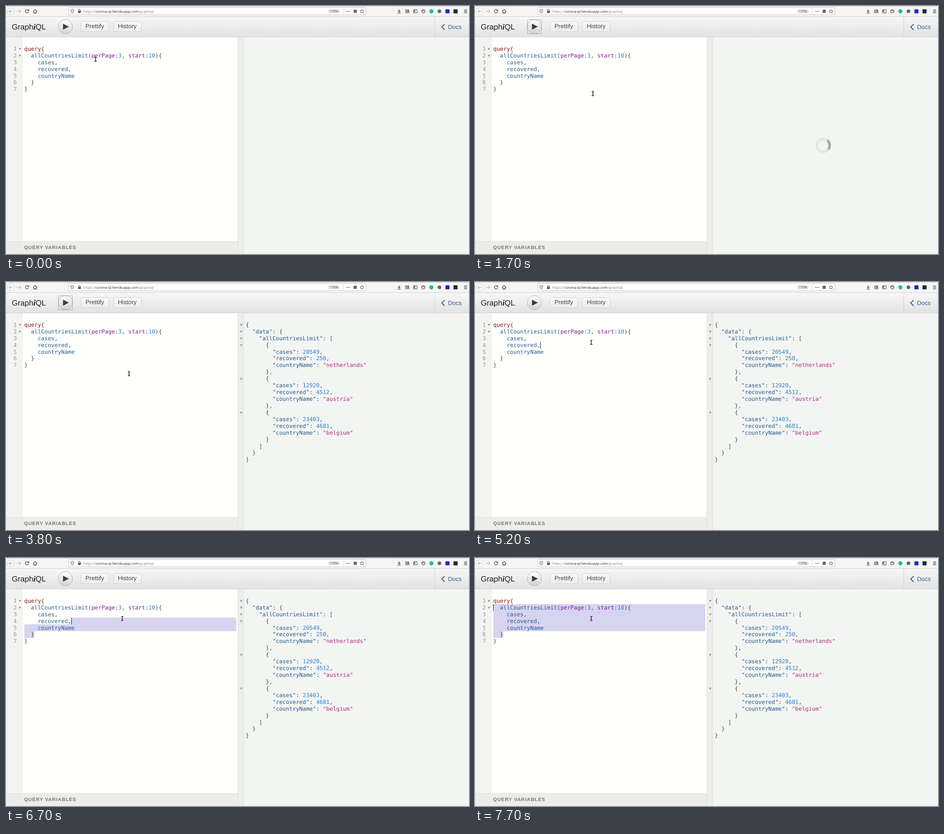
These frames come from a looping animation (1021x549 px, 8000 ms). An HTML page:

```html
<!DOCTYPE html>
<html lang="en">
<head>
<meta charset="utf-8">
<title>GraphiQL</title>
<style>
  html, body { margin: 0; width: 100%; height: 100%; overflow: hidden; background: #f3f5f3; }
  svg { display: block; width: 1021px; height: 549px; }
  text { white-space: pre; text-rendering: geometricPrecision; font: 13.26px "Liberation Sans", Arial, sans-serif; fill: #444; }
  .code text { font: 12.31px "DejaVu Sans Mono", monospace; fill: #484848; }
  .code .num { fill: #999; }
  .fold { fill: #999; }
  .url { font: 7.9px "Open Sans", sans-serif; fill: #858585; }
  .icons { fill: none; stroke: #555; stroke-width: 1.2; }
</style>
</head>
<body>
<svg viewBox="0 0 1021 549">
  <defs>
    <linearGradient id="bar" x2="0" y2="1"><stop stop-color="#f7f7f7"/><stop offset="1" stop-color="#e2e2e2"/></linearGradient>
    <linearGradient id="btn" x2="0" y2="1"><stop stop-color="#f9f9f9"/><stop offset="1" stop-color="#ececec"/></linearGradient>
    <linearGradient id="play" x2="0" y2="1"><stop stop-color="#fdfdfd"/><stop offset="1" stop-color="#d2d3d6"/></linearGradient>
    <linearGradient id="pressed" x2="0" y2="1"><stop stop-color="#dddddd"/><stop offset="1" stop-color="#f8f8f8"/></linearGradient>
  </defs>

  <!-- browser bar -->
  <rect width="1021" height="24" fill="#f5f5f4"/>
  <rect width="1021" height="1" fill="#c9c9c7"/>
  <rect x="138.5" y="3.5" width="655" height="16" rx="1.5" fill="#fff" stroke="#c8c8c8"/>
  <g class="icons">
    <circle cx="10.5" cy="11.8" r="8" fill="#f9f9f8" stroke="#d2d2d2" stroke-width="1"/>
    <path d="M14.5 11.8H7M10 8.5L6.7 11.8L10 15M24.5 11.8H32M29.5 8.5L32.7 11.8L29.5 15" stroke="#b4b4b4"/>
    <path d="M49.3 9.3A3.7 3.7 0 1 0 50 13M50.3 7.5V10.5H47" stroke="#444"/>
    <path d="M59.8 12L64.2 7.8L68.6 12M61.2 11.5V15.7H67.2V11.5M64.2 15.5V13" stroke="#444"/>
    <path d="M142.8 8.6L146 7.8L149.2 8.6V11.5Q149 14.5 146 16Q143 14.5 142.8 11.5ZM146 10V13.6" stroke-width="1"/>
    <path d="M160 11V9.8A2 2 0 0 1 164 9.8V11"/>
    <rect x="158.8" y="11" width="6.4" height="4.5" rx=".8" fill="#555" stroke="none"/>
    <rect x="709.5" y="7" width="26.5" height="9.5" rx="4.7" fill="#e4e4e4" stroke="none"/>
    <path d="M743.5 5V18.5" stroke="#d2d2d2" stroke-width="1"/>
    <path d="M750.4 11.8H758.6" stroke-width="1.8" stroke-dasharray="1.8 1.4"/>
    <rect x="766.5" y="8.2" width="7" height="7" rx="1" fill="#666" stroke="none"/>
    <path d="M785 7.6L786.2 10.4L789.2 10.7L786.9 12.7L787.6 15.7L785 14.1L782.4 15.7L783.1 12.7L780.8 10.7L783.8 10.4Z" stroke-width="1"/>
    <path d="M867 7.5V13M864.3 10.7L867 13.4L869.7 10.7M863.5 15.7H870.5" stroke="#444"/>
    <path d="M881.5 7.5V16M884 7.5V16M886.4 7.5V16M887.3 8L889.3 15.8" stroke="#444"/>
    <path d="M898.6 8.2H906.6V15.2H898.6ZM901.8 8.2V15.2M899 10.2H901M899 12H901" stroke="#444" stroke-width="1"/>
    <circle cx="920.3" cy="11.8" r="3.6" stroke="#444"/><path d="M918 10.6H922.6" stroke="#444"/>
    <path d="M1010 8.7H1017M1010 11.8H1017M1010 14.9H1017" stroke="#444"/>
    <g stroke="none">
      <circle cx="938" cy="11.8" r="4.6" fill="#17c39a"/>
      <circle cx="955.8" cy="11.8" r="4" fill="#65656b"/>
      <rect x="969" y="7.3" width="9" height="9" rx="1.5" fill="#2426c9"/>
      <rect x="986.8" y="7.3" width="9" height="9" fill="#1e2a35"/>
    </g>
  </g>
  <text class="url" x="170.3" y="14.8">https://<tspan fill="#222">corona-ql.herokuapp.com</tspan>/graphiql</text>
  <text x="714.5" y="14.3" style="font:7px 'Open Sans',sans-serif">170%</text>

  <!-- toolbar -->
  <rect y="23.5" width="1021" height="45" fill="url(#bar)"/>
  <path d="M0 23.5H1021M0 68.5H1021M945.5 24V68" stroke="#d0d0d0"/>
  <text x="12.8" y="52" style="font-size:17.04px;fill:#1d1d1d">Graph<tspan style="font:italic bold 18px 'Liberation Serif',serif">i</tspan>QL</text>
  <circle id="run" cx="131" cy="45.8" r="15.8" fill="url(#play)" stroke="#b3b3b3"/>
  <path d="M125.7 39.2L138.6 45.8L125.7 52.4Z" fill="#3d3d3d"/>
  <rect id="focus" x="115.5" y="30.5" width="31" height="31" fill="none" stroke="#666" stroke-dasharray="1 1"/>
  <rect x="165.5" y="34.5" width="61.5" height="22.5" rx="3" fill="url(#btn)" stroke="#cfcfcf"/>
  <rect x="236.9" y="34.5" width="61.5" height="22.5" rx="3" fill="url(#btn)" stroke="#cfcfcf"/>
  <text x="175.2" y="49.4">Prettify</text>
  <text x="246.7" y="49.4">History</text>
  <path d="M967.3 40.3L960.8 46.5L967.3 52.7" fill="none" stroke="#3b5998" stroke-width="1.9"/>
  <text x="974.8" y="51" style="fill:#3b5998">Docs</text>

  <!-- panes -->
  <rect y="69" width="512" height="452" fill="#fffffc"/>
  <rect y="69" width="35.5" height="452" fill="#f3f4f1"/>
  <path d="M35.5 69V521" stroke="#e6e7e4"/>
  <rect x="511.5" y="69" width="13" height="480" fill="#eceeec"/>
  <rect x="524.5" y="69" width="497" height="480" fill="#f3f5f3"/>
  <rect y="521" width="511.5" height="28" fill="#ecedea"/>
  <path d="M0 521.2H511.5M511.5 69V549M524 69V549" stroke="#dfe0de"/>
  <text x="40" y="538.4" style="font-weight:bold;font-size:10.65px;letter-spacing:.95px;fill:#747474">QUERY VARIABLES</text>

  <g id="selection" fill="#d7d4f0"></g>
  <g id="query" class="code"></g>
  <g id="result" class="code"></g>
  <g id="folds" class="fold"></g>
  <rect id="caret" width="1" height="15" fill="#111"/>
  <g id="spinner" fill="none" stroke-width="5.6">
    <circle r="14.2" stroke="#969696" stroke-opacity=".15"/>
    <path d="M-10.04 -10.04A14.2 14.2 0 0 1 10.04 -10.04" stroke="#969696" stroke-opacity=".8"/>
  </g>

  <g id="beam" fill="none">
    <path d="M-2.5 -4.3H2.5M0 -4.3V4.3M-2.5 4.3H2.5" stroke="#333" stroke-width="1.7"/>
  </g>
  <path id="hand" d="M-1.6 -4.6Q-.7 -5.4 0 -4.6V-1.4L3.8 -.5Q4.8 0 4.6 1.2L3.8 4.6H-1L-4 .8Q-3.6 -.4 -2.6 .2L-1.6 1Z" fill="#fff" stroke="#222" stroke-width="1.1"/>
</svg>
<script>
const LOOP = 8000, CHAR = 7.41, LINE = 14.93, TOP = 87.1, LEFT = 40.3, RIGHT = 508;
const $ = id => document.getElementById(id);
const show = (id, on) => $(id).style.display = on ? '' : 'none';
const lineY = i => TOP + i * LINE;
const text = (x, i, body, cls = '') => `<text class="${cls}" x="${x}" y="${lineY(i) + 11.7}">${body}</text>`;
const fold = (x, i) => `<path d="M${x} ${lineY(i) + 6}h5.4l-2.7 4.8z"/>`;

function color(token, next) {
  if (token === 'query') return '#8a1318';
  if (/^\d/.test(token)) return '#2e7fd0';
  if (token[0] === '"') return next === ':' ? '#245a8a' : '#b5297e';
  return next === ':' ? '#7b1e96' : '#265f90';
}
const highlight = line => line.replace(/"\w+"|\w+/g, (token, at) =>
  `<tspan fill="${color(token, line[at + token.length])}">${token}</tspan>`);
const block = (x, lines) => lines.map((line, i) => text(x, i, highlight(line))).join('');

const query = ['query{', '  allCountriesLimit(perPage:3, start:10){', '    cases,',
  '    recovered,', '    countryName', '  }', '}'];
const data = { data: { allCountriesLimit: [
  { cases: 20549, recovered: 250, countryName: 'netherlands' },
  { cases: 12920, recovered: 4512, countryName: 'austria' },
  { cases: 23403, recovered: 4681, countryName: 'belgium' }
] } };

$('query').innerHTML = block(LEFT, query) +
  query.map((_, i) => text(16.4, i, i + 1, 'num')).join('') +
  `<g class="fold">${fold(28, 0) + fold(28, 1)}</g>`;
$('result').innerHTML = block(528.4, JSON.stringify(data, null, 2).split('\n'));
$('folds').innerHTML = [0, 1, 2, 3, 8, 13].map(i => fold(516, i)).join('');

// time, x, y, hand?
const pointer = [
  [0, 197.5, 118], [100, 185, 111], [200, 165, 101], [300, 150.5, 91],
  [500, 136, 64, 1], [600, 130.5, 58, 1], [1400, 150, 82], [1500, 190, 125],
  [1600, 232, 168], [1700, 260, 194], [1800, 266, 204], [1900, 269, 209],
  [2000, 270.5, 212], [3800, 271.3, 203], [4000, 271.5, 195], [4100, 272, 180],
  [4200, 273, 165], [4300, 273.3, 158], [5000, 261.3, 140], [5200, 256.4, 133.8]
];
// time, line, column
const carets = [
  [0, -1], [4500, 4, 15], [5000, -1], [5200, 3, 14], [5800, 4, 14], [6500, 5, 3],
  [6600, 4, 14], [6700, 3, 14], [6800, 2, 10], [7100, 1, 14], [7200, 0, 6], [7700, 1, 0]
];
const at = (keys, t) => keys.filter(k => k[0] <= t).pop();

function drawCaret(t) {
  const [, line, col] = at(carets, t), last = 5;
  show('caret', line >= 0);
  let boxes = '';
  if (line >= 0) {
    const x = LEFT + col * CHAR;
    $('caret').setAttribute('x', Math.round(x));
    $('caret').setAttribute('y', Math.round(lineY(line)));
    if (t >= 6600) for (let i = line; i <= last; i++) {
      const from = i === line ? x : LEFT, to = i === last ? LEFT + 3 * CHAR : RIGHT;
      boxes += `<rect x="${from}" y="${lineY(i)}" width="${to - from}" height="${LINE + .2}"/>`;
    }
  }
  $('selection').innerHTML = boxes;
}

function draw(now) {
  const t = Math.floor(now % LOOP / 100) * 100;
  const [, x, y, hand] = at(pointer, t);
  for (const id of ['beam', 'hand']) {
    show(id, (id === 'hand') === !!hand);
    $(id).setAttribute('transform', `translate(${x} ${y})`);
  }
  show('focus', t >= 900 && t < 4500);
  $('run').setAttribute('fill', t === 900 ? 'url(#pressed)' : 'url(#play)');
  show('spinner', t >= 1000 && t < 2400);
  $('spinner').setAttribute('transform', `translate(768 308.5) rotate(${109 + (t - 1100) * .559})`);
  show('result', t >= 2400);
  show('folds', t >= 3000);
  drawCaret(t);
  requestAnimationFrame(draw);
}
draw(0);
</script>
</body>
</html>
```
